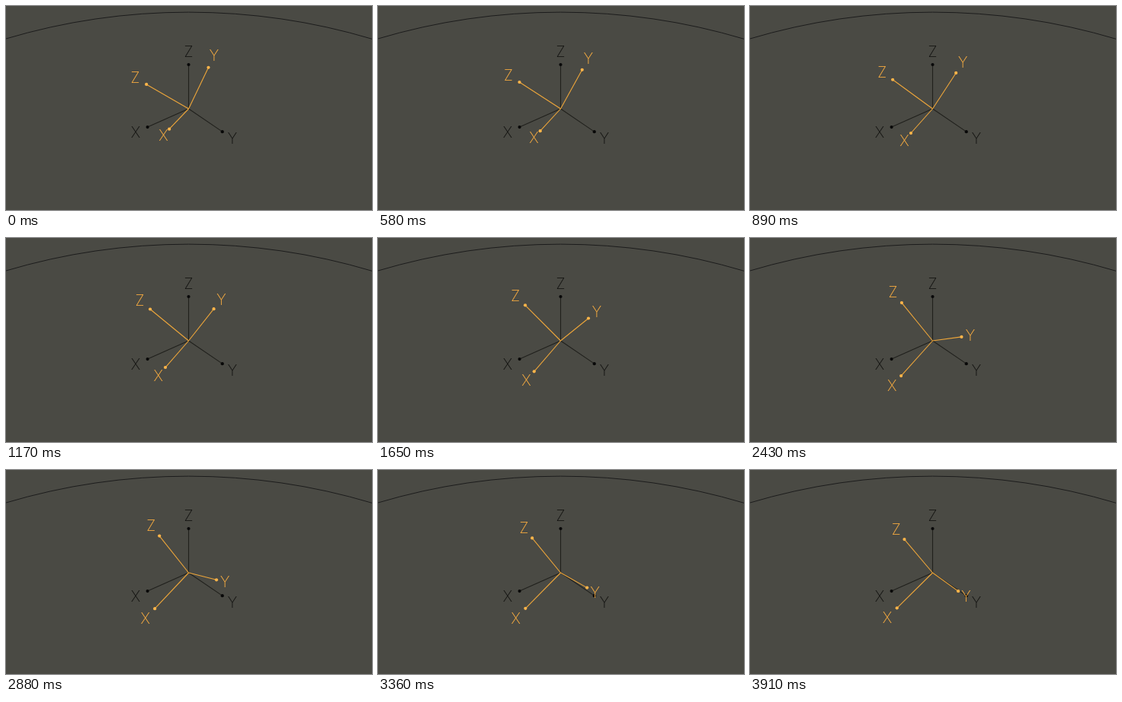
Animation of 480 by 268 pixels, one loop 3950 ms. Source, as an HTML page:

```html
<!DOCTYPE html>
<html lang="en">
<head>
<meta charset="utf-8">
<title>Rotating axes</title>
<style>
  html, body { margin: 0; width: 100%; height: 100%; overflow: hidden; background: #4a4a44; }
  svg { display: block; width: 100vw; height: 100vh; }
  text { font: 200 19.5px Inter, Lato, "Open Sans", sans-serif; text-anchor: middle; }
  line { stroke-width: 1.1; }
  .fixed line { stroke: #20201c; }
  .fixed circle { fill: #080808; }
  .fixed text { fill: #121210; }
  .moving line { stroke: #eea63a; }
  .moving circle { fill: #ffb54a; }
  .moving text { fill: #ffb040; }
</style>
</head>
<body>
<svg id="stage" viewBox="0 0 480 268">
  <path d="M-1 43.3A840 840 0 0 1 480 43.3" fill="none" stroke="#1c1c1c"/>
</svg>
<script>
const LOOP = 3950, STEPS = 115;
const CENTER = { x: 239.5, y: 135 };
const SCALE = 65.5, DISTANCE = 9.5, LABEL_REACH = 1.27;
const AZIMUTH = radians(39), ELEVATION = radians(33.5);

// Rotation vectors in degrees: the turn follows a quadratic curve through them
const START = [70.6, 10.2, 32], BEND = [41, 15, 12.2], END = [12.4, 30.7, -7.6];

const UNITS = { X: [1, 0, 0], Y: [0, 1, 0], Z: [0, 0, 1] };
const stage = document.getElementById('stage');

function radians(degrees) {
  return degrees * Math.PI / 180;
}

function set(node, attrs) {
  for (const name in attrs) node.setAttribute(name, attrs[name]);
  return node;
}

function add(parent, tag, attrs = {}) {
  const node = document.createElementNS('http://www.w3.org/2000/svg', tag);
  parent.appendChild(node);
  return set(node, attrs);
}

function project([x, y, z], reach = 1) {
  const right = y * Math.sin(AZIMUTH) - x * Math.cos(AZIMUTH);
  const front = x * Math.sin(AZIMUTH) + y * Math.cos(AZIMUTH);
  const up = z * Math.cos(ELEVATION) - front * Math.sin(ELEVATION);
  const near = z * Math.sin(ELEVATION) + front * Math.cos(ELEVATION);
  const zoom = SCALE * reach / (1 - near * reach / DISTANCE);
  return { x: CENTER.x + right * zoom, y: CENTER.y - up * zoom };
}

// Rodrigues' formula
function rotate(v, turn) {
  const length = Math.hypot(...turn), angle = radians(length);
  const k = turn.map(part => part / length);
  const cos = Math.cos(angle), sin = Math.sin(angle);
  const dot = k[0] * v[0] + k[1] * v[1] + k[2] * v[2];
  return v.map((part, i) => {
    const j = (i + 1) % 3, m = (i + 2) % 3;
    return part * cos + (k[j] * v[m] - k[m] * v[j]) * sin + k[i] * dot * (1 - cos);
  });
}

function makeAxes(className) {
  const group = add(stage, 'g', { class: className });
  const axes = Object.entries(UNITS).map(([name, unit]) => {
    const line = add(group, 'line', { x1: CENTER.x, y1: CENTER.y });
    const dot = add(group, 'circle', { r: 2.1 });
    const label = add(group, 'text');
    label.textContent = name;
    return { unit, line, dot, label };
  });
  return turn => {
    for (const { unit, line, dot, label } of axes) {
      const direction = turn ? rotate(unit, turn) : unit;
      const tip = project(direction), end = project(direction, LABEL_REACH);
      set(line, { x2: tip.x, y2: tip.y });
      set(dot, { cx: tip.x, cy: tip.y });
      set(label, { x: end.x, y: end.y + 7 });
    }
  };
}

makeAxes('fixed')();
const poseMoving = makeAxes('moving');

function draw(ms) {
  const step = Math.min(STEPS - 1, Math.floor((ms % LOOP + 6) / LOOP * STEPS));
  const u = step / (STEPS - 1);
  const t = u * u * (3 - 2 * u), s = 1 - t;
  poseMoving(START.map((a, i) => s * s * a + 2 * s * t * BEND[i] + t * t * END[i]));
}

const start = performance.now();
function tick() {
  draw(performance.now() - start);
  requestAnimationFrame(tick);
}
tick();
</script>
</body>
</html>
```
